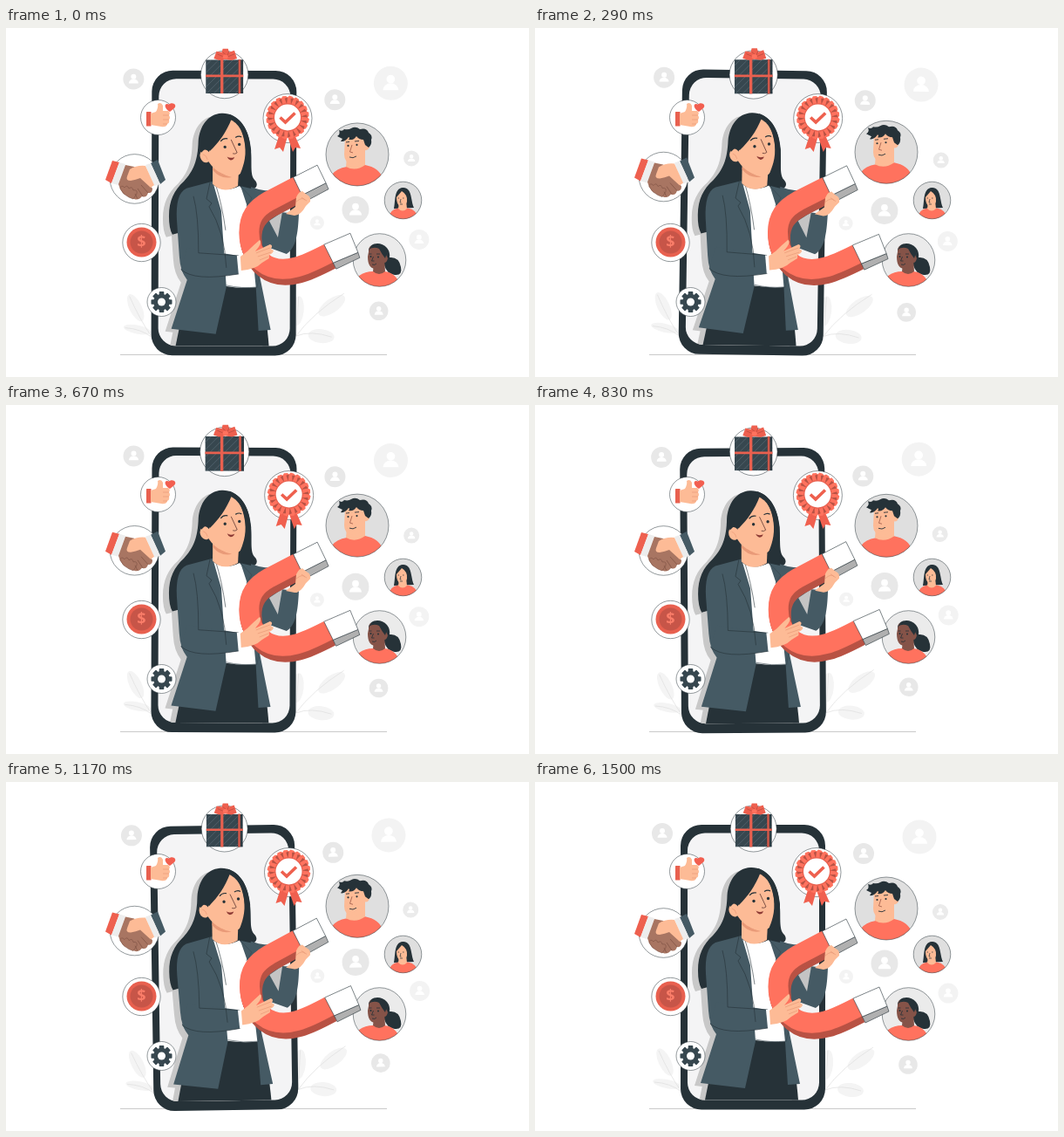
These frames come from a looping animation (600x400 px, 1540 ms). An HTML page with a canvas:

```html
<!DOCTYPE html>
<html lang="en">
<head>
<meta charset="utf-8">
<title>Magnet marketing</title>
<style>
html, body { margin: 0; width: 100%; height: 100%; overflow: hidden; background: #fff; }
canvas { display: block; }
</style>
</head>
<body>
<canvas id="stage" width="600" height="400"></canvas>
<script>
const ctx = document.getElementById('stage').getContext('2d');
const LOOP = 1540, PHASE = 40, TAU = Math.PI * 2;
const INK = '#263238', SUIT = '#455a64', CORAL = '#ff725e', RUST = '#b85244',
      SKIN = '#fdbb96', SKIN_SHADE = '#e99a78', BROWN = '#a87562', DEEP = '#855348';

function shape(d, fill, stroke, width = 0.7) {
  const path = new Path2D(d);
  if (fill) { ctx.fillStyle = fill; ctx.fill(path); }
  if (stroke) { ctx.strokeStyle = stroke; ctx.lineWidth = width; ctx.stroke(path); }
}
const line = (d, color, width) => shape(d, null, color, width);

function oval(x, y, rx, ry, fill, angle = 0, stroke) {
  ctx.beginPath();
  ctx.ellipse(x, y, rx, ry, angle, 0, TAU);
  if (fill) { ctx.fillStyle = fill; ctx.fill(); }
  if (stroke) { ctx.strokeStyle = stroke; ctx.lineWidth = 0.5; ctx.stroke(); }
}
const disc = (x, y, r, fill, stroke) => oval(x, y, r, r, fill, 0, stroke);

function box(x, y, w, h, r, fill) {
  ctx.beginPath();
  ctx.roundRect(x, y, w, h, r);
  ctx.fillStyle = fill;
  ctx.fill();
}

function group(draw, dx = 0, dy = 0) {
  ctx.save();
  ctx.translate(dx, dy);
  draw();
  ctx.restore();
}

// Linear interpolation through [time, value] pairs.
function track(keys, t) {
  const i = keys.findIndex(k => k[0] > t);
  if (i < 1) return keys[i < 0 ? keys.length - 1 : 0][1];
  const [a, u] = keys[i - 1], [b, v] = keys[i];
  return u + (v - u) * (t - a) / (b - a);
}

function person(x, y, r, tone) {
  disc(x, y, r, tone);
  disc(x, y - r * 0.24, r * 0.25, '#fff');
  ctx.beginPath();
  ctx.ellipse(x, y + r * 0.4, r * 0.46, r * 0.4, 0, Math.PI, TAU);
  ctx.fill();
}

function people() {
  const tone = '#e8e8e8', pale = '#f3f3f3';
  [[146, 59, 12, tone], [441, 63, 19.5, pale], [377, 82, 12, tone], [465, 149, 9, '#ebebeb'],
   [401, 208, 15.5, tone], [357, 223, 8, pale], [474, 242, 11.5, pale], [428, 324, 10.8, tone]]
    .forEach(p => person(...p));
}

function plants() {
  [[149, 321, 7, 17, -0.45], [151, 346, 16, 5, 0.2], [374, 318, 18, 8, -0.62],
   [335, 324, 7, 17, 0.1], [362, 353, 15, 8, 0.1]]
    .forEach(([x, y, a, b, turn]) => oval(x, y, a, b, '#f4f4f4', turn));
  line('M142 308Q154 335 168 355M137 344Q155 345 168 355M388 304Q352 327 333 353M333 353Q350 346 374 354M336 308L333 353', '#dedede');
}

const HAIR = 'M247 98C231 99 222 113 220.5 130C220 152 215 164 204 176C193 186 187 198 187 216Q187 230 191 237L236 225L280 186C288 184 290 179 285 174C279 167 283 151 280 136C278 112 264 97 247 98Z';
const JACKET = 'M237 176L207 184C198 188 195 201 196 220L199 262Q200 279 208 289L190 345L241 351L253 297L247 210Z';
const SKIRT = 'M244 296L291 296C297 320 300 340 302 364.5L195 364.5L201 335Z';

function phone() {
  const screen = [175, 58.5, 151, 306, 20];
  box(167, 49, 166, 326.5, 24, INK);
  box(...screen, '#f4f4f5');
  ctx.save();
  ctx.beginPath();
  ctx.roundRect(...screen);
  ctx.clip();
  group(() => [HAIR, JACKET, SKIRT].forEach(d => shape(d, '#c8c8c8')), -7, 3);
  ctx.restore();
}

function head() {
  shape('M237 152L237 179Q249 191 266 181L267 162Z', SKIN);
  shape('M238 157Q246 169 259 171Q246 174 237 163Z', SKIN_SHADE);
  oval(228.5, 147, 6, 7.5, SKIN, -0.3);
  shape('M255 104C268 109 273 121 274.5 136C276 155 273 169 262 170C248 170 236 162 230 149L236 134Z', SKIN);
  shape('M259 103C252 121 244 131 234 141L229 138L224 143C219 126 227 103 248 99Z', INK);
  shape('M254 101C266 106 272 119 274 134C276 150 271 161 268 169L268 181L281 184L281 140C279 118 270 104 256 99Z', INK);
  line('M226 145Q230 146 231 151', SKIN_SHADE);
  disc(251, 136.5, 1.7, INK);
  disc(267.5, 133.5, 1.7, INK);
  line('M246 130Q249 126 254 127M263 125.5Q267 123 270 125', INK, 1.2);
  line('M258 128L265 143Q263 145 260 144', '#70473e', 0.9);
  shape('M253.5 147.5Q257 150 262 148Q261 151.5 257.5 151.5Q254.5 150.5 253.5 147.5Z', '#8d3b35');
}

function body() {
  shape(SKIRT, INK);
  shape('M236 179Q250 190 268 181L282 199L290 297Q271 299 253 296L244 210Z', '#fff');
  shape('M268 178L290 185Q304 188 319 185L314 211L336 213C335 236 333 252 322 259L300 251L291 283L304 346L290 347L287 298L278 208Z', SUIT);
  shape('M302 221L317 211L312 240Z', '#c4c4c4');
  shape(JACKET, SUIT);
  shape('M208 252L267 261L268 282L222 288Q207 290 201 277Z', SUIT);
  line('M234 177L230 196L236 201L233 205Q251 234 253 275M215 193Q221 214 221 258L267 261M201 277Q216 291 267 282M240 178Q248 203 252 232', INK, 0.6);
  line('M268 180L282 195L276 204L283 220M291 283L288 298M253 295Q271 299 288 297', '#37474f', 0.6);
  shape('M265 261L270 261L272 281L267 282Z', '#fff');
}

const BEND = 'M334.5 181L302 198C286 207 279 217 279 234C279 262 300 283 333 274Q345 271 370 258';

function magnet() {
  for (let i = 7; i >= 0; i--) {
    group(() => line(BEND, i ? RUST : CORAL, 23), i * 0.42, i);
  }
  shape('M339.5 191.5L367 177.5L370 184.5L343 199ZM375.5 269L404 257L406 263L379 276Z', '#b0b0b0', INK, 0.6);
  shape('M329.5 171L357 157L367 177.5L339.5 191.5ZM365 248L395 235L404 257L375.5 269Z', '#fff', INK, 0.6);
}

function hands() {
  shape('M321 213L332 205L333 194Q336 187 340 187L345 191Q350 193 349 199L344 204Q338 215 331 215Z', SKIN);
  line('M333 199Q340 193 343 197M339 194L345 198', SKIN_SHADE);
  shape('M269 262L277 256Q284 249 291 243Q294 245 290 251L286 256L303 248Q307 249 304 253L307 255Q307 258 302 260L302 264L294 269Q286 277 270 278Z', SKIN);
  line('M287 258L303 252M289 262L304 257M291 266L301 262', SKIN_SHADE);
}

const frameDisc = (x, y, r, fill = '#fff') => disc(x, y, r, fill, INK);

function thumb() {
  frameDisc(174.5, 102.5, 20);
  box(161, 96, 5.5, 16.5, 0.5, '#e8604f');
  shape('M166 98L172 96Q175 91 174 87Q178 84 180 89L180 95L186 95Q189 97 187 100Q189 103 187 105Q188 109 185 110Q184 114 178 113L166 111Z', SKIN);
  line('M180 100L187 100M180 105L187 105M180 110L185 110', SKIN_SHADE);
  shape('M188 96C180 91 182 85 187 87.5C191 84 197 88 193 92Z', '#f25f50');
}

function gift() {
  frameDisc(0, 0, 26.5);
  ctx.save();
  ctx.beginPath();
  ctx.rect(-21, -16.5, 42, 37.5);
  ctx.clip();
  box(-21, -17, 42, 38, 0, '#37474f');
  for (let x = -60; x < 30; x += 8) line(`M${x} 21L${x + 38} -17`, '#667781', 0.5);
  box(15, -17, 6, 38, 0, '#263238a0');
  ctx.restore();
  box(-4.5, -17, 3.2, 38, 0, '#e8604f');
  box(15.5, -17, 2.6, 38, 0, '#cf584a');
  box(-21, 0, 42, 2.6, 0, '#e8604f');
  shape('M1 -17L-6 -16L-12 -18L-9 -26L-3 -25L-2 -29L4 -29L5 -25L11 -27L14 -18L8 -16Z', '#ee604f');
  line('M1 -19L-8 -23M1 -19L11 -23M-2 -25L3 -21L5 -26', '#b64a3e', 0.7);
  oval(1, -20, 3, 2.5, CORAL);
}

function badge() {
  const cx = 323, cy = 102.5;
  const at = (r, a) => `${cx + r * Math.cos(a)} ${cy + r * Math.sin(a)}`;
  frameDisc(cx, cy + 1, 28);
  shape('M314 121L308 139L314 137L318 142L323 124ZM323 124L329 142L332 137L338 138L330 120Z', '#f0604f');
  let rim = '', folds = '';
  for (let i = 0; i < 20; i++) {
    const a = i / 20 * TAU;
    rim += `${i ? 'L' : 'M'}${at(23, a)}L${at(25, a + 0.08)}L${at(24.5, a + 0.24)}`;
    folds += `M${at(15, a - 0.06)}L${at(23, a)}L${at(22, a - 0.15)}Z`;
  }
  shape(rim + 'Z', CORAL);
  shape(folds, '#b85244');
  disc(cx, cy, 16.2, '#e8604f');
  disc(cx, cy, 15, '#fff');
  line('M314.5 102.5L320.5 108L331.5 97.5', '#ee604e', 3.6);
}

function handshake() {
  frameDisc(147.5, 173, 28.3);
  shape('M122 152L130 154L121 178L114 174Z', '#ee604f');
  shape('M130 154L137 156L129 180L121 178Z', '#ededed');
  shape('M166 155L174 151L183 174L177 179Z', SUIT);
  shape('M160 157L166 155L177 179L170 181Z', '#ededed');
  shape('M137 157L147 159L160 174L168 184Q168 190 163 189Q161 195 156 193Q152 198 147 196L134 189Q130 184 129 179Z', BROWN);
  shape('M142 162Q150 157 160 158L170 180L166 183L154 172Q149 174 143 175Q137 175 139 170Z', SKIN);
  shape('M131 184Q132 179 136 183Q139 179 141 184Q145 181 146 186Q151 185 150 190L146 196L141 194L135 190Z', BROWN, '#7d5143', 0.6);
  line('M155 180L163 189M151 184L157 193M148 190L151 196', '#7d5143', 0.7);
}

function coin() {
  frameDisc(155.5, 246, 21.7);
  disc(155.5, 245.5, 17, '#e8604f');
  disc(155.5, 245.5, 13, '#c75548');
  ctx.fillStyle = '#fa7d69';
  ctx.font = 'bold 18px "Open Sans", sans-serif';
  ctx.textAlign = 'center';
  ctx.textBaseline = 'middle';
  ctx.fillText('$', 155.5, 246);
}

function gear() {
  frameDisc(178.5, 314, 16.5);
  for (let i = 0; i < 8; i++) {
    ctx.save();
    ctx.translate(178.5, 314);
    ctx.rotate(i * TAU / 8);
    box(-2.8, -12, 5.6, 8, 0.8, '#37474f');
    ctx.restore();
  }
  disc(178.5, 314, 9.3, '#37474f');
  disc(178.5, 314, 4.5, '#fff');
}

function portrait(x, y, r, draw, backdrop = '#dfdfdf') {
  ctx.save();
  disc(x, y, r, backdrop);
  ctx.clip();
  draw();
  ctx.restore();
  disc(x, y, r, null, INK);
}

function man() {
  shape('M366 185L374 168Q379 161 391 159L412 157Q428 160 432 172L438 185Z', CORAL);
  shape('M391 148L390 159Q401 165 412 157L412 140Z', SKIN);
  shape('M389 125Q402 118 412 125L414 132Q418 132 417 137Q415 141 412 140Q409 157 398 156Q388 155 388 145Z', SKIN);
  shape('M380 124Q384 122 382 117Q386 119 388 116Q393 117 396 115Q401 112 406 116Q414 114 416 120Q421 123 419 128Q420 134 416 137L412 134L410 128Q405 128 402 124Q399 129 393 128Q395 126 393 125Q389 131 384 130L386 127Z', INK);
  disc(392.5, 135, 1.1, INK);
  disc(402.5, 134, 1.1, INK);
  line('M390 131L394 130.5M400 130L405 129.5M394 148Q398 150 402 147', INK, 0.9);
  line('M397 134L394.5 142L398 143', '#9c5847', 0.8);
}

function girl() {
  shape('M445 207C447 198 445 184 455 183C466 182 464 197 468 206Z', INK);
  shape('M438 219Q440 208 450 206.5L461 206.5Q471 208 474 219Z', CORAL);
  shape('M451 200L450 207Q455 212 460 207L459 198Z', SKIN);
  shape('M454 187Q461 191 460 199Q458 206 453 205Q448 203 448 194Z', SKIN);
  line('M449.5 195h1.6M455 195h1.6M453 196l-1 4h1.5M452 202h3', INK, 0.7);
}

function friend() {
  shape('M416 256C416 246 430 244 437 252Q441 257 440 263Q451 262 453 274Q455 284 446 283Q437 282 434 272Z', INK);
  shape('M400 299L405 284Q412 279 421 279L434 279Q448 280 454 298Z', CORAL);
  shape('M422 270L421 279Q428 285 435 279L434 264Z', DEEP);
  shape('M417 251Q429 247 435 258L438 264Q437 269 434 269Q430 277 423 276Q415 275 415 262Z', DEEP);
  shape('M416 254Q421 246 430 249L437 258L435 264Q431 259 428 253Q422 250 416 254Z', INK);
  disc(418.5, 262, 1, INK);
  disc(427, 262.5, 1, INK);
  line('M416.5 259h3M425 259h4M421.5 262l-2 5h3M420 271q3 1.5 5 -1', INK, 0.8);
}

function render(now) {
  const t = now % LOOP, angle = (t + PHASE) / LOOP * TAU;
  const lift = (Math.cos(angle) - 1) / 2;
  const beat = track([[0, 1.026], [114, 1.1], [422, 1], [576, 1], [730, 1.1], [884, 1], [LOOP, 1]], t);
  const shake = track([[0, 0], [200, 1.6], [540, 1.9], [830, 1.4], [960, 0], [1170, 1.5], [1500, 0]], t);

  ctx.fillStyle = '#fff';
  ctx.fillRect(0, 0, 600, 400);
  line('M131 374.5H437', '#c4c4c4', 0.9);

  group(() => portrait(403, 145, 36, man), 0, 7 * lift);
  portrait(455.5, 197.5, 21.3, girl);
  portrait(428.5, 266, 30.3, friend, '#ebebeb');

  ctx.save();
  ctx.translate(300, 200);
  ctx.rotate(0.0152 * Math.sin(angle));
  ctx.translate(-300, -200);
  [people, plants, phone].forEach(draw => draw());
  shape(HAIR, INK);
  [body, head, magnet, hands].forEach(draw => draw());
  ctx.restore();

  ctx.save();
  ctx.translate(250.7, 53.5);
  ctx.scale(beat, beat);
  gift();
  ctx.restore();
  group(badge, shake);
  group(handshake, 0, 6.3 * lift);
  [thumb, coin, gear].forEach(draw => draw());
  requestAnimationFrame(tick);
}

const start = performance.now();
function tick() { render(performance.now() - start); }
tick();
</script>
</body>
</html>
```
